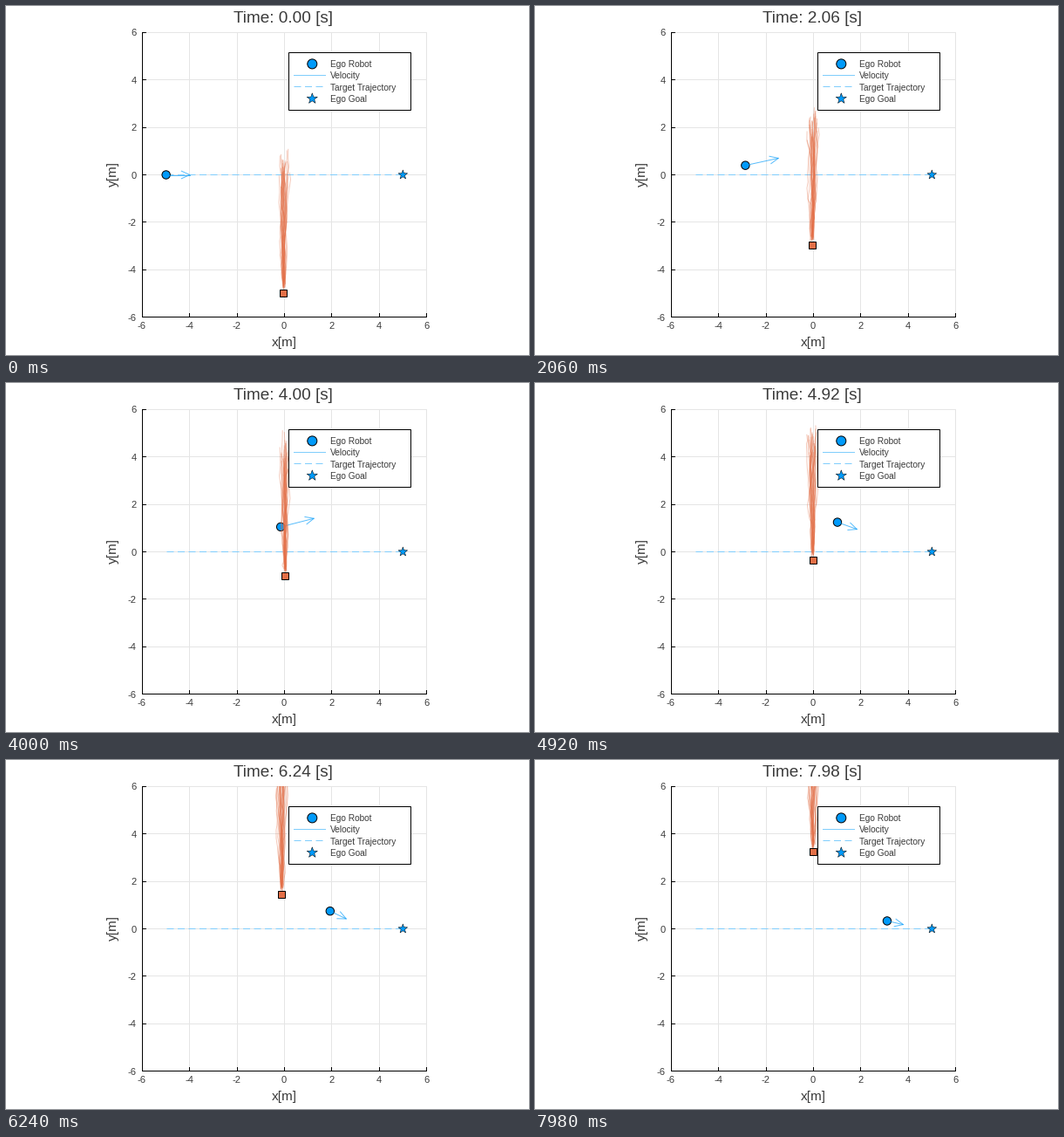
A matplotlib script that plays this animation: 600 px wide and 400 px high, repeating every 8000 ms.

```python
import numpy as np
import matplotlib
import matplotlib.pyplot as plt
from matplotlib.animation import FuncAnimation
from matplotlib.collections import LineCollection
from matplotlib.patches import Circle, Polygon, Rectangle

matplotlib.rcParams["font.family"] = "Liberation Sans"

W, H = 600, 400
FRAMES, DT = 400, 0.02
PT = 0.72                      # points per pixel at 100 dpi
X0, Y0, SCALE = 319.5, 193.5, 27.17
LEFT, RIGHT, TOP, BOTTOM = 156, 482, 30, 356
BLUE, PALE, ORANGE, GREY = "#009afa", "#80cdfc", "#e36f47", "#3a3a3a"
DASH = (0, (8, 4.5))
TRAILS, STEPS = 28, 16

fig = plt.figure(figsize=(W / 100, H / 100), dpi=100, facecolor="white")
ax = fig.add_axes([0, 0, 1, 1])
ax.set_xlim(0, W)
ax.set_ylim(H, 0)
ax.axis("off")


def to_px(x, y):
    return X0 + SCALE * x, Y0 - SCALE * y


def line(xs, ys, color, z, **kw):
    return ax.plot(xs, ys, color=color, lw=PT, zorder=z, **kw)[0]


def label(x, y, text, size, ha="center", z=9):
    return ax.text(x, y, text, fontsize=size * PT, color=GREY, ha=ha,
                   va="baseline", zorder=z)


def disc(x, y, r, z):
    return ax.add_patch(Circle((x, y), r, fc=BLUE, ec="black", lw=PT, zorder=z))


def star(x, y, r, z):
    a = np.arange(10) * np.pi / 5
    rad = np.where(np.arange(10) % 2, 0.4 * r, r)
    pts = np.column_stack([x + rad * np.sin(a), y - rad * np.cos(a)])
    ax.add_patch(Polygon(pts, fc=BLUE, ec="black", lw=0.5 * PT, zorder=z))


# ---- axes, grid and labels
for v in range(-6, 7, 2):
    cx, cy = to_px(v, v)
    gx, gy = cx - 0.5, cy - 0.5          # whole pixels for crisp lines
    line([gx, gx], [TOP, BOTTOM], "#e5e5e5", 1)
    line([LEFT, RIGHT], [gy, gy], "#e5e5e5", 1)
    line([gx, gx], [BOTTOM - 4, BOTTOM], "black", 2)
    line([LEFT, LEFT + 4], [gy, gy], "black", 2)
    label(gx, 369.7, str(v), 11.1)
    label(149.5, cy + 4, str(v), 11.1, ha="right")
line([LEFT, LEFT, RIGHT], [TOP, BOTTOM, BOTTOM], "black", 2)
label(319, 390, "x[m]", 15.4)
ax.text(130, 192.5, "y[m]", fontsize=15.4 * PT, color=GREY, rotation=90,
        ha="right", va="center", zorder=9)
title = label(317.7, 19, "", 19)

# ---- planned path and goal
line([to_px(-5, 0)[0], to_px(5, 0)[0]], [Y0 - 0.5] * 2, PALE, 3, ls=DASH)
star(*to_px(5, 0), 5.6, 4)

# ---- legend
ax.add_patch(Rectangle((324, 53), 140, 66, fc="white", ec="black", lw=PT,
                       zorder=10))
disc(351.3, 66.4, 5.5, 11)
line([330, 366], [79, 79], PALE, 11)
line([330, 366], [92, 92], PALE, 11, ls=DASH)
star(351.3, 106.2, 6.4, 11)
for row, text in enumerate(["Ego Robot", "Velocity", "Target Trajectory",
                            "Ego Goal"]):
    label(371.5, 70 + 13.3 * row, text, 10.1, ha="left", z=12)

# ---- robot: speeds up, swerves around the walker, then eases to the goal
t = np.arange(FRAMES) * DT
u = np.clip(t / 2.2, 0, 1)
passing = 1 / (1 + np.exp(10 * (t - 4.78)))
vx = 0.68 + 0.32 * np.exp(-t / 0.1) + 0.72 * u * u * (3 - 2 * u) * passing
vy = (0.37 * (1 - np.exp(-t / 1.2)) * passing
      - (0.95 - 0.1 * t) * (1 - passing))


def integrate(v):
    return np.concatenate([[0], np.cumsum((v[1:] + v[:-1]) * DT / 2)])


robot_x, robot_y = -5 + integrate(vx), integrate(vy)

# ---- walker: steady climb with a slow sway and a seeded tremor
walk_rng = np.random.default_rng(4)


def tremor():
    return np.convolve(walk_rng.normal(0, 0.04, FRAMES), np.ones(9) / 9, "same")


walker_x = -0.035 - 0.05 * np.cos(2 * np.pi * (t - 6.24) / 5) + tremor()
walker_y = (-5 + 1.031 * t - 0.25 * np.sin(np.pi * t / 2)
            - 0.18 * np.sin(np.pi * t / 8) + tremor())

robot = disc(0, 0, 4.7, 5)
shaft = line([], [], BLUE, 6, alpha=0.65)
head = line([], [], BLUE, 6, alpha=0.65)
trails = LineCollection([], colors=ORANGE, linewidths=0.9 * PT, alpha=0.4,
                        zorder=7)
ax.add_collection(trails, autolim=False)
trails.set_clip_path(Rectangle((LEFT, TOP), RIGHT - LEFT, BOTTOM - TOP,
                               transform=ax.transData))
walker = ax.add_patch(Rectangle((0, 0), 8, 8, fc=ORANGE, ec="black", lw=PT,
                                zorder=8))


def predict(frame, x, y):
    """Random walks that fan out ahead of the walker."""
    rng = np.random.default_rng(100 + frame)
    dx = rng.normal(0, 0.031, (TRAILS, STEPS)).cumsum(axis=1)
    dy = rng.normal(0.325, 0.1, (TRAILS, STEPS)).cumsum(axis=1)
    return np.stack(to_px(x + dx, y + dy), axis=-1)


def draw(frame):
    title.set_text(f"Time: {t[frame]:.2f} [s]")

    base = np.array(to_px(robot_x[frame], robot_y[frame]))
    step = SCALE * np.array([vx[frame], -vy[frame]])
    tip = base + step
    robot.center = base
    shaft.set_data(*zip(base, tip))
    d = step / np.hypot(*step)
    n = np.array([-d[1], d[0]])
    head.set_data(*zip(tip - 9.5 * d + 4.3 * n, tip, tip - 9.5 * d - 4.3 * n))

    x, y = walker_x[frame], walker_y[frame]
    trails.set_segments(predict(frame, x, y))
    px, py = to_px(x, y)
    walker.set_xy((px - 4.5, py - 4.5))
    return title, robot, shaft, head, trails, walker


anim = FuncAnimation(fig, draw, frames=FRAMES, interval=DT * 1000,
                     repeat=True, repeat_delay=0, blit=False)
plt.show()
```
